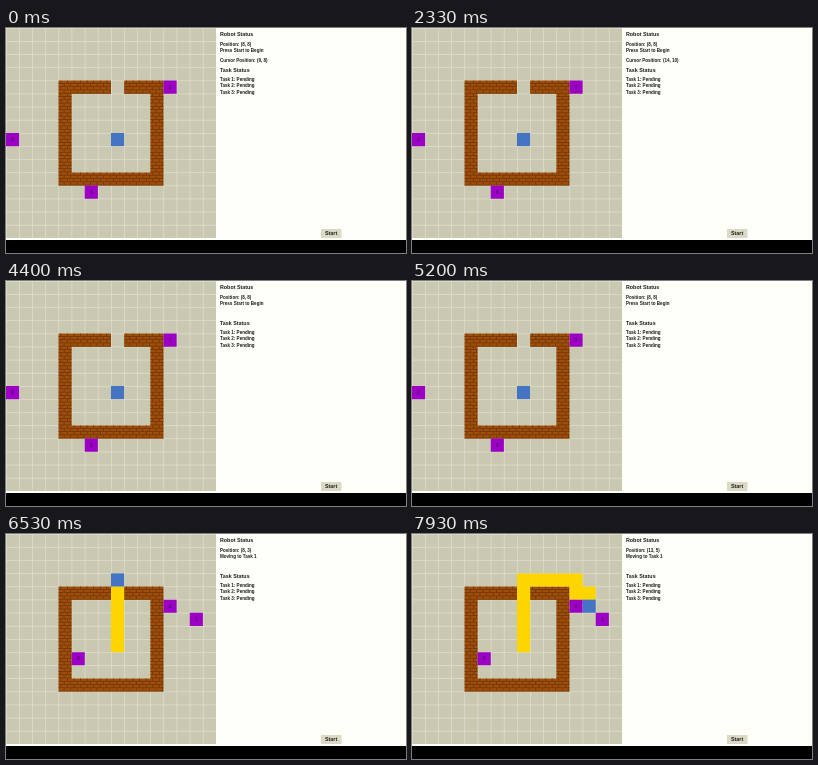
An HTML page with a canvas that plays this animation: 400 px wide and 225 px high, repeating every 8000 ms.

```html
<!DOCTYPE html>
<html lang="en">
<head>
<meta charset="utf-8">
<title>Robot grid</title>
<style>
  html, body { margin: 0; width: 100%; height: 100%; overflow: hidden; background: #000; }
  canvas { display: block; width: 400px; height: 225px; }
</style>
</head>
<body>
<canvas id="stage" width="400" height="225"></canvas>
<script>
const ctx = document.getElementById('stage').getContext('2d');
const LOOP = 8000, COLS = 16, MAP = 210, CELL = MAP / COLS, STEP = 200;
const START = 5525, CURSOR_OUT = 3510;
const TITLE = 5.35, BODY = 4.56;

// Tasks are listed in number order, as [column, row].
const tasksBefore = [[12, 4], [0, 8], [6, 12]];
const tasksAfter = [[14, 6], [12, 5], [5, 9]];

const route = [[8, 8]];
for (const move of 'UUUUURRRRDRD') {
  const [x, y] = route[route.length - 1];
  route.push([x + (move === 'R'), y + (move === 'D') - (move === 'U')]);
}

const walls = [];
for (let i = 4; i <= 11; i++) {
  if (i !== 8) walls.push([i, 4]);
  walls.push([i, 11]);
  if (i > 4 && i < 11) walls.push([4, i], [11, i]);
}

function rect(x, y, w, h, color) {
  ctx.fillStyle = color;
  ctx.fillRect(x, y, w, h);
}

// One path for all cells, so that neighbours join without seams.
function cells(list, color) {
  ctx.beginPath();
  for (const [col, row] of list) ctx.rect(col * CELL, row * CELL, CELL, CELL);
  ctx.fillStyle = color;
  ctx.fill();
}

function text(str, x, y, size, color = '#1c1c18') {
  ctx.font = `bold ${size}px "Liberation Sans", Arial, sans-serif`;
  ctx.fillStyle = color;
  ctx.fillText(str, x, y);
}

function drawFloor() {
  rect(0, 0, MAP, MAP, '#c9c8b0');
  for (let i = 0; i < COLS; i++) {
    rect(i * CELL, 0, 0.6, MAP, '#e4e3d8');
    rect(0, i * CELL, MAP, 0.6, '#e4e3d8');
  }
}

function drawWalls() {
  const mortar = '#6e3206';
  cells(walls, '#9d4e0a');
  for (const [col, row] of walls) {
    for (let course = 0; course < 4; course++) {
      const x = col * CELL, y = row * CELL + course * CELL / 4;
      rect(x, y + 2.5, CELL, 0.7, mortar);
      for (let i = 0; i < 2; i++) rect(x + 2 + i * CELL / 2 + (course % 2) * CELL / 4, y, 0.7, 2.5, mortar);
    }
  }
}

function drawMap(step) {
  const reached = Math.max(0, step);
  const tasks = step < 0 ? tasksBefore : tasksAfter;
  drawFloor();
  drawWalls();
  cells(route.slice(0, reached), '#ffd500');
  cells(tasks, '#9c00c4');
  tasks.forEach(([col, row], i) => text(String(i + 1), col * CELL + 5.3, row * CELL + 8.2, 4.6, '#4c0068'));
  cells([route[reached]], '#4674c4');
}

function drawPanel(t, step) {
  const [col, row] = route[Math.max(0, step)];
  text('Robot Status', 214, 8.3, TITLE);
  text(`Position: (${col}, ${row})`, 214, 17.6, BODY);
  text(step < 0 ? 'Press Start to Begin' : 'Moving to Task 1', 214, 23.9, BODY);
  if (t < CURSOR_OUT) {
    const p = Math.min(1, Math.max(0, (t - 900) / 1200));
    text(`Cursor Position: (${9 + Math.floor(5 * p)}, ${8 + Math.floor(2 * p)})`, 214, 33.5, BODY);
  }
  text('Task Status', 214, 43.5, TITLE);
  for (let i = 0; i < 3; i++) text(`Task ${i + 1}: Pending`, 214, 52.7 + i * 6.55, BODY);
  rect(315, 201, 20.5, 9, '#dcdac6');
  text('Start', 319, 207.4, TITLE);
}

function draw(now) {
  const t = now % LOOP;
  const step = Math.min(route.length - 1, Math.floor((t - START) / STEP));
  rect(0, 0, 400, 225, '#000');
  rect(0, 0, 400, 212, '#fffffa');
  drawMap(step);
  drawPanel(t, step);
  requestAnimationFrame(() => draw(performance.now() - begin));
}

const begin = performance.now();
draw(0);
</script>
</body>
</html>
```
